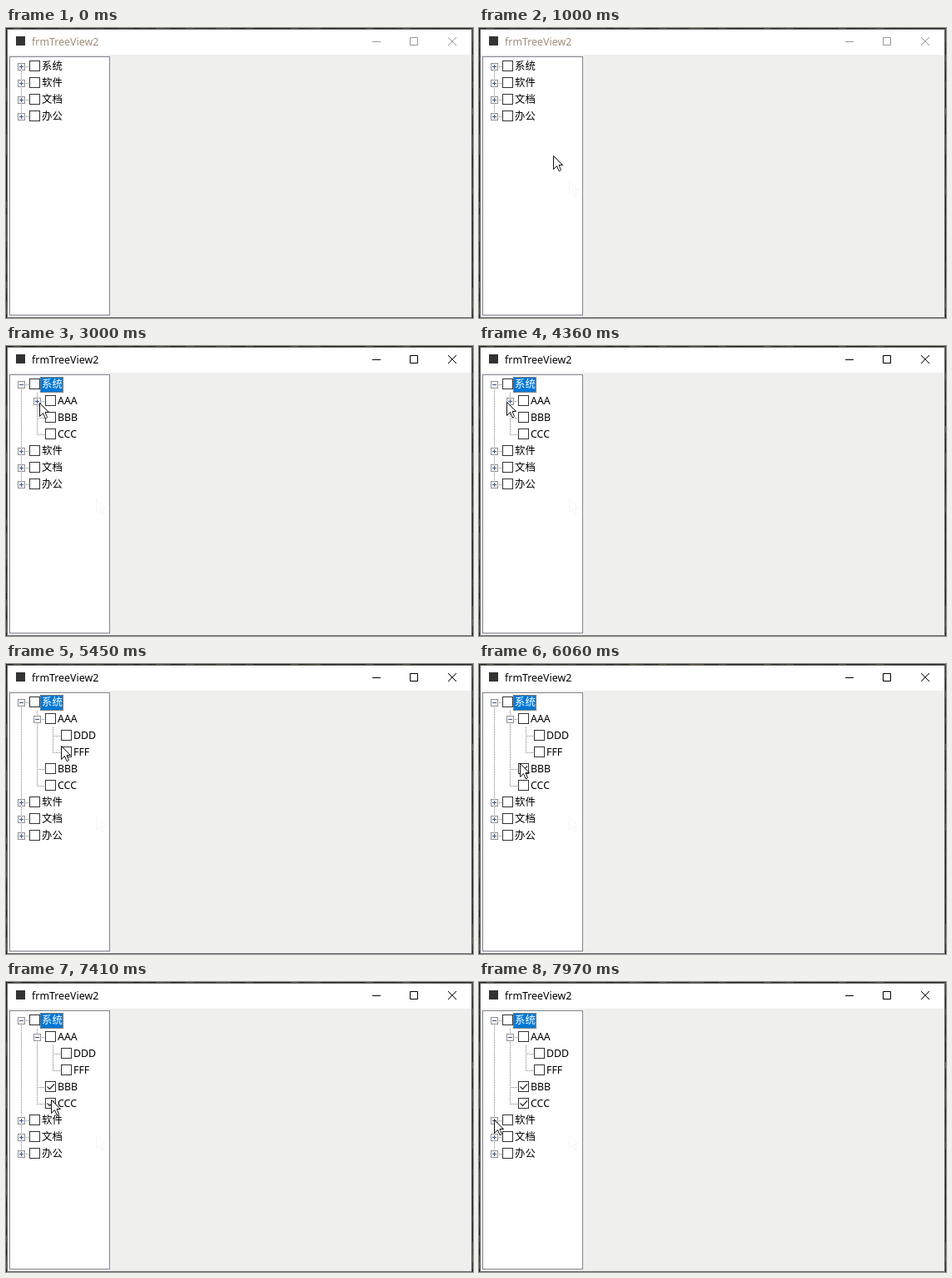
Animation of 561x348 px, one loop 8000 ms. Source, as an HTML page:

```html
<!DOCTYPE html>
<html lang="zh">
<head>
<meta charset="utf-8">
<title>frmTreeView2</title>
<style>
  html, body { margin: 0; width: 100%; height: 100%; overflow: hidden; }
  svg { display: block; width: 561px; height: 348px; }
  text { font: 12.4px "Noto Sans", "Noto Sans CJK SC", "Noto Sans CJK", sans-serif; white-space: pre; }
  .crisp { shape-rendering: crispEdges; }
</style>
</head>
<body>
<svg viewBox="0 0 561 348">
  <rect width="561" height="348" fill="#2c2b2a"/>
  <g id="desktop" class="crisp"></g>
  <g class="crisp">
    <rect x="1" y="1" width="559" height="347" fill="#666"/>
    <rect x="2" y="2" width="557" height="345" fill="#efefee"/>
    <rect x="2" y="2" width="557" height="30" fill="#fff"/>
    <rect x="12" y="10" width="11" height="11" fill="#333"/>
  </g>
  <text id="caption" x="31" y="21">frmTreeView2</text>
  <g id="buttons" fill="none">
    <path d="M440 16.5h10M485.5 11.5h9v9h-9z"/>
    <path d="M531 11l10 10M541 11l-10 10"/>
  </g>
  <rect x="4.5" y="34.5" width="120" height="310" fill="#fff" stroke="#828790"/>
  <path id="trace" fill="none" stroke="#f5f5f5" transform="translate(108,183)"/>
  <g id="tree"></g>
  <path id="pointer" fill="#fff" stroke="#111" stroke-linejoin="round"/>
</svg>
<script>
const LOOP = 8000, STEP = 70;
const TRACE = 930, ACTIVATE = 2210, OPEN_ROOT = 2340, OPEN_AAA = 4910, CHECK_BBB = 6060, CHECK_CCC = 7280;
const ARROW = "M.5 .5V16.5L4.5 12.5L7 18.5H8.5L9.5 17.5L7 11.5H11.5Z";
const $ = id => document.getElementById(id);

// The pointer rests between moves; each runs straight to its end point.
const ENTRY = [255, 350];
const move = (start, end, x, y) => ({ start, end, to: [x, y] });
const moves = [
  move(520, 660, 108, 183),
  move(930, 1480, 21, 49),
  move(1740, 1820, 18, 48),
  move(2610, 3000, 40, 68),
  move(3410, 3750, 51, 67),
  move(4080, 4360, 33, 67),
  move(4650, 4710, 41, 67),
  move(OPEN_AAA + STEP, 5450, 66, 98),
  move(5510, 5660, 59, 121),
  move(5730, 5800, 49, 119),
  move(CHECK_BBB + STEP, 6400, 62, 132),
  move(6480, 6720, 56, 149),
  move(6930, 7130, 50, 140),
  move(CHECK_CCC + STEP, 7550, 65, 142),
  move(7620, 7970, 18, 165)
];

function pointerAt(t) {
  let pos = ENTRY;
  for (const { start, end, to } of moves) {
    if (t < start) break;
    const gaps = Math.max(1, Math.round((end - start) / STEP));
    const done = Math.floor(Math.min(1, (t - start) / (end - start)) * gaps + 0.01);
    const u = (done + 1) / (gaps + 1);
    pos = pos.map((from, i) => Math.round(from + (to[i] - from) * u));
  }
  return pos;
}

function nodesAt(t) {
  const node = (label, more) => ({ label, ...more });
  const aaa = node("AAA", { kids: [node("DDD"), node("FFF")], open: t >= OPEN_AAA });
  const bbb = node("BBB", { checked: t >= CHECK_BBB });
  const ccc = node("CCC", { checked: t >= CHECK_CCC });
  const root = node("系统", { kids: [aaa, bbb, ccc], open: t >= OPEN_ROOT, selected: t >= ACTIVATE });
  return [root, ...["软件", "文档", "办公"].map(label => node(label, { kids: [] }))];
}

const dots = (x1, y1, x2, y2) =>
  `<path class="crisp" d="M${x1} ${y1}L${x2} ${y2}" stroke="#808080" stroke-dasharray="1 1"/>`;

function expander(x, y, open) {
  const bar = open ? "" : `M${x + 4.5} ${y - 2}v5`;
  return `<rect x="${x + .5}" y="${y - 3.5}" width="8" height="8" fill="#f8f8f8" stroke="#919191"/>` +
    `<path class="crisp" d="M${x + 2} ${y + .5}h5${bar}" stroke="#40568f"/>`;
}

function checkbox(x, y, checked) {
  const tick = `<path d="M${x + 2.5} ${y - .5}l3 3l5.5 -6" fill="none" stroke="#333" stroke-width="1.3"/>`;
  return `<rect x="${x + .5}" y="${y - 6.5}" width="12" height="12" fill="#fff" stroke="#333"/>` +
    (checked ? tick : "");
}

function label(x, y, { label, selected }) {
  const focus = `<rect x="${x - 2}" y="${y - 9}" width="28" height="19" fill="#0078d7"/>` +
    `<rect x="${x - 1.5}" y="${y - 8.5}" width="27" height="18" fill="none" stroke="#ff8728" ` +
    `stroke-dasharray="1 1" stroke-dashoffset=".5"/>`;
  return (selected ? focus : "") +
    `<text x="${x}" y="${y + 4}" fill="${selected ? "#fff" : "#000"}">${label}</text>`;
}

function treeMarkup(roots) {
  let row = 0, lines = "", parts = "";
  const walk = (nodes, level, top) => {
    const x = 14 + 19 * level;
    let y;
    for (const node of nodes) {
      y = 46 + 20 * row++;
      lines += dots(x + 4, y + .5, x + 13, y + .5);
      if (node.kids) parts += expander(x, y, node.open);
      parts += checkbox(x + 14, y, node.checked) + label(x + 29, y, node);
      if (node.open) walk(node.kids, level + 1, y + 10);
    }
    lines += dots(x + 4.5, top, x + 4.5, y + 1);
  };
  walk(roots, 0, 46);
  return lines + parts;
}

// Slivers of dark wallpaper around the window.
function desktopMarkup() {
  let seed = 7, out = "";
  const rand = () => (seed = seed * 16807 % 2147483647) / 2147483647;
  const patch = (x, y, w, h) => {
    const light = 12 + 22 * rand() ** 3;
    out += `<rect x="${x}" y="${y}" width="${w}" height="${h}" fill="hsl(38 12% ${light}%)"/>`;
  };
  for (let x = 0; x < 561; x += 9) patch(x, 0, 9, 1);
  for (let y = 0; y < 348; y += 8) {
    patch(0, y, 1, 8);
    patch(560, y, 1, 8);
  }
  return out;
}

let shown = "";
function draw(t) {
  const active = t >= ACTIVATE;
  $("caption").setAttribute("fill", active ? "#000" : "#a18d79");
  $("buttons").setAttribute("stroke", active ? "#000" : "#999");
  $("trace").style.display = t >= TRACE ? "" : "none";

  const markup = treeMarkup(nodesAt(t));
  if (markup !== shown) $("tree").innerHTML = shown = markup;

  $("pointer").setAttribute("transform", `translate(${pointerAt(t)})`);
}

$("desktop").innerHTML = desktopMarkup();
for (const id of ["pointer", "trace"]) $(id).setAttribute("d", ARROW);

const begin = performance.now();
function tick() {
  draw((performance.now() - begin) % LOOP);
  requestAnimationFrame(tick);
}
tick();
</script>
</body>
</html>
```
